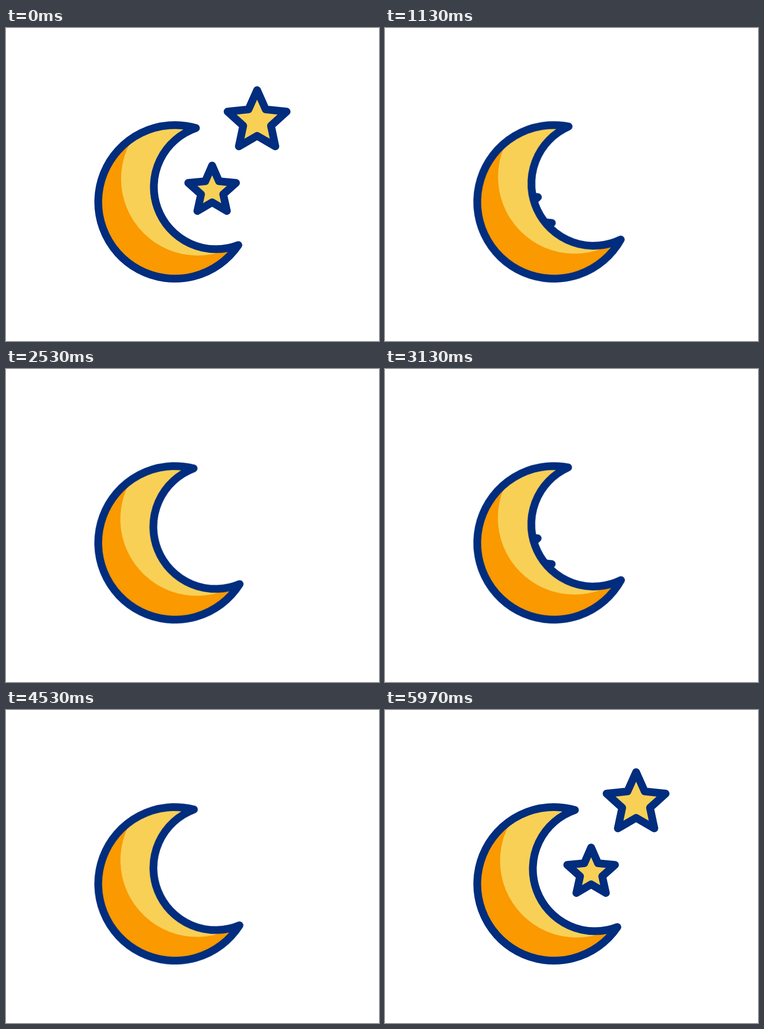
These frames come from a looping animation (817x685 px, 6010 ms). An HTML page:

```html
<!DOCTYPE html>
<html lang="en">
<head>
<meta charset="utf-8">
<title>Moon and stars</title>
<style>
  html, body { margin: 0; width: 100%; height: 100%; overflow: hidden; background: #fff; }
  svg { display: block; width: 817px; height: 685px; }

  .line { stroke: #002d7d; stroke-width: 17; stroke-linejoin: round; }
  .star { fill: #f9d056; animation: hide 2003.33ms infinite; }
  #big { --away: translate(-284px, 190px); }
  #small { --away: translate(-140.5px, 89px); }
  #moon { transform-origin: 369.8px 380.8px; animation: rock 2003.33ms infinite; }

  .star, #moon { animation-timing-function: cubic-bezier(.33, 0, .67, 1); }

  /* Stars slip behind the moon, wait unseen, then come back out. */
  @keyframes hide {
    0% { transform: none; visibility: visible; }
    24% { transform: var(--away); visibility: hidden; animation-timing-function: step-end; }
    54% { transform: var(--away); visibility: visible; }
    88%, 100% { transform: none; visibility: visible; }
  }

  @keyframes rock {
    0%, 24% { transform: rotate(0deg); }
    42% { transform: rotate(-38deg); }
    60.6%, 100% { transform: rotate(0deg); }
  }
</style>
</head>
<body>
<svg viewBox="0 0 817 685">
  <defs>
    <path id="crescent" d="M416 219A168 168 0 1 0 509 475A136.21 136.21 0 1 1 416 219Z"/>
    <clipPath id="inside"><use href="#crescent"/></clipPath>
  </defs>
  <polygon id="big" class="star line"/>
  <polygon id="small" class="star line"/>
  <g id="moon">
    <use href="#crescent" fill="#fa9900"/>
    <circle cx="420" cy="330" r="168" fill="#f9d056" clip-path="url(#inside)"/>
    <use href="#crescent" class="line" fill="none"/>
  </g>
</svg>
<script>
  function shapeStar(id, cx, cy, outer, inner) {
    const points = Array.from({ length: 10 }, (_, i) => {
      const r = i % 2 ? inner : outer;
      const a = (i * 36 - 90) * Math.PI / 180;
      return (cx + r * Math.cos(a)).toFixed(2) + ',' + (cy + r * Math.sin(a)).toFixed(2);
    });
    document.getElementById(id).setAttribute('points', points.join(' '));
  }
  shapeStar('big', 550, 204, 68, 32);
  shapeStar('small', 451.5, 356, 55, 25.5);
</script>
</body>
</html>
```
